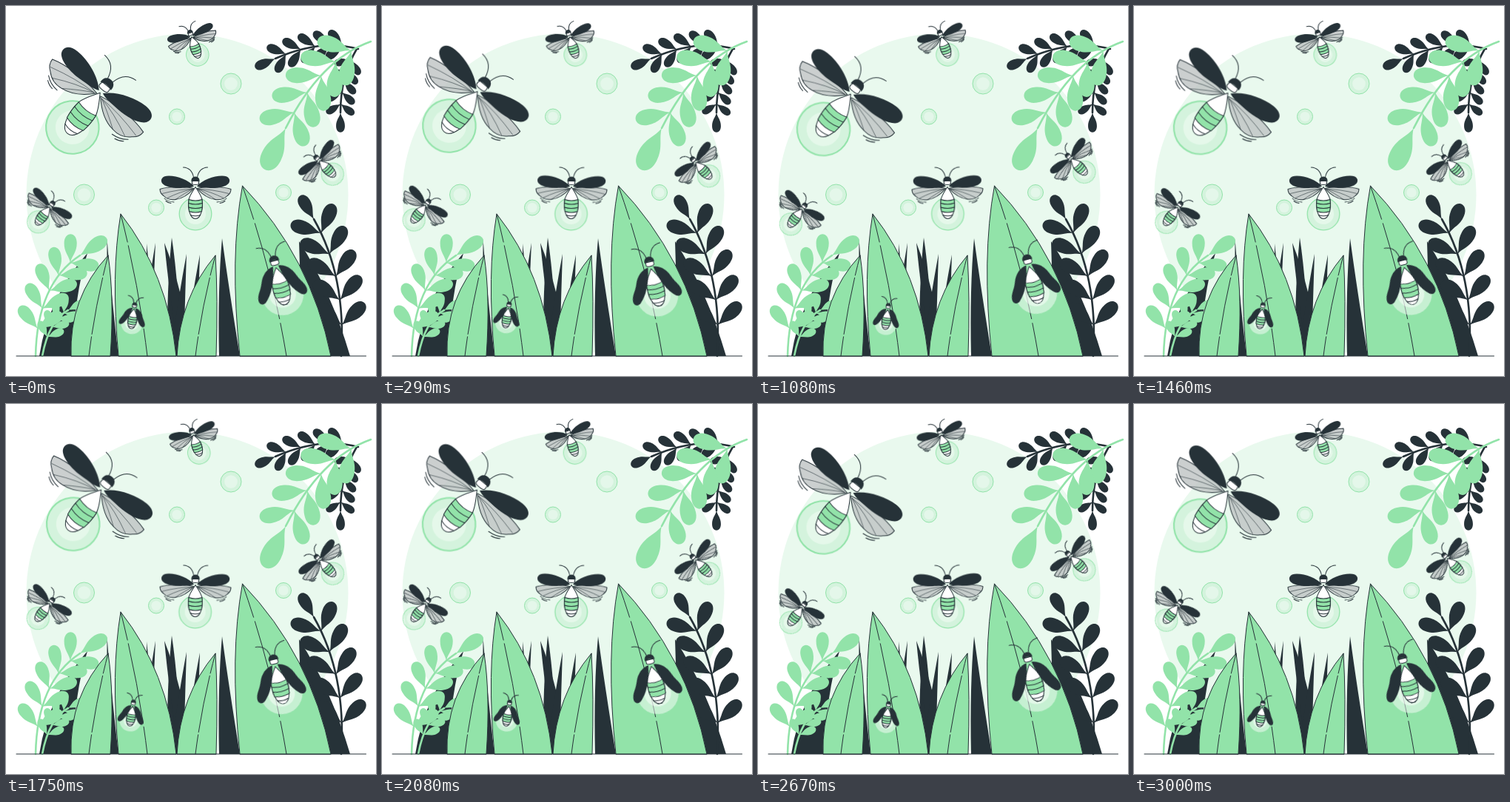
These frames come from a looping animation (500 px wide and 500 px high, 3.04 s). An HTML page:

```html
<!DOCTYPE html>
<html lang="en">
<head>
<meta charset="utf-8">
<title>Fireflies</title>
<style>
  html, body { margin: 0; width: 100%; height: 100%; overflow: hidden; background: #fff; }
  svg { display: block; width: 100%; height: 100%; }
  .dark { fill: #263238; }
  .green { fill: #92e3a9; }
  .line { fill: none; stroke: #263238; stroke-linecap: round; stroke-linejoin: round; vector-effect: non-scaling-stroke; }
  .vein { stroke-width: .6; }
  .line.white { fill: #fff; }
  .line.green { fill: #92e3a9; }
  .line.hind { fill: #bfc3c3; fill-opacity: .8; }
  .stem { fill: none; stroke-width: 2.6; stroke-linecap: round; }
  .stem.dark { stroke: #263238; fill: none; }
  .stem.green { stroke: #92e3a9; fill: none; }
  .halo { fill: #92e3a9; fill-opacity: .24; stroke: #92e3a9; }
  .core { fill: #fff; fill-opacity: .38; }
  .shine { fill: #fff; fill-opacity: .48; }
  #swarm { transform-origin: 250px 250px; animation: wind 1520ms linear infinite; }
  @keyframes wind {
    0%, 100% { transform: rotate(0deg); }
    25% { transform: rotate(1deg); }
    75% { transform: rotate(-1deg); }
  }
</style>
</head>
<body>
<svg viewBox="0 0 500 500">
  <defs>
    <path id="leaf" d="M0 0C.25 -.05 .35 -.22 .68 -.22C1.1 -.22 1.1 .22 .68 .22C.35 .22 .25 .05 0 0Z"/>

    <g id="hindwing">
      <path class="line hind" d="M-2 12C-16 9 -35 9 -48 13C-48 17 -46 20 -43 22C-39 26 -33 28 -27 27C-18 26 -9 20 -2 12Z"/>
      <path class="line vein" d="M-4 13Q-22 13 -45 19M-4 13Q-20 16 -38 25M-4 13Q-14 18 -27 27"/>
      <path class="line" d="M-42 25.5Q-37 30 -29 30.5M-40 29Q-37 31.5 -33 32"/>
    </g>
    <path id="openwing" class="dark" d="M-2 9C-9 1 -24 -5 -36 -5C-45 -5 -48 0 -45 5C-41 10 -30 12 -20 11.5C-12 11 -6 11 -2 9Z"/>
    <path id="shutwing" class="dark" d="M-3 8C-11 9 -17 15 -20 23C-23 31 -27 34 -28 40C-29 45 -25 49 -20 45C-13 39 -6 26 -3 8Z"/>

    <g id="belly">
      <path class="line white" d="M0 10C-3 15 -7 20 -9 27C-10.5 37 -8 53 0 53C8 53 10.5 37 9 27C7 20 3 15 0 10Z"/>
      <path class="line green" d="M-9 27Q0 30 9 27Q10 35 8.6 43Q0 46 -8.6 43Q-10 35 -9 27Z"/>
      <path class="line" d="M-9.4 32Q0 35 9.4 32M-9.3 37.5Q0 40.5 9.3 37.5M-6.6 48Q0 50.5 6.6 48"/>
    </g>
    <g id="head">
      <path class="line white" d="M-4 2C-6 7 -3 7 0 7C3 7 6 7 4 2Z"/>
      <path class="dark" d="M-5.5 3C-6 -1 -4 -4 0 -4C4 -4 6 -1 5.5 3C3 1 -3 1 -5.5 3Z"/>
      <path class="line" d="M-2.5 -3C-4 -11 -8 -16 -16.5 -16.5M2.5 -3C4 -11 8 -16 16.5 -16.5"/>
    </g>

    <g id="flyer">
      <circle class="halo" cy="46.5" r="21.8" stroke-width="1.3"/>
      <circle class="core" cy="46.5" r="14"/>
      <use href="#hindwing"/><use href="#hindwing" transform="scale(-1 1)"/>
      <use href="#belly"/>
      <use href="#openwing"/><use href="#openwing" transform="scale(-1 1)"/>
      <use href="#head"/>
    </g>
    <g id="sitter">
      <circle class="shine" cy="41" r="23.5"/>
      <circle class="shine" cy="41" r="15"/>
      <use href="#belly"/>
      <use href="#shutwing"/><use href="#shutwing" transform="scale(-1 1)"/>
      <use href="#head"/>
    </g>
  </defs>

  <circle cx="245" cy="255" r="217.5" fill="#e9f9ee"/>
  <g id="orbs"></g>
  <g id="grass"></g>
  <g id="plants"></g>
  <g id="blades"></g>
  <path class="line" d="M14 473H486.5"/>
  <g id="swarm"></g>
</svg>
<script>
  const GROUND = 473;
  const fill = (id, parts) => document.getElementById(id).innerHTML = parts.join('');

  // A blade stands on the ground from x0 to x1; each edge bows sideways on its way to the tip.
  const blade = (cls, x0, x1, tipX, tipY, bow0 = 0, bow1 = 0) => {
    const y = tipY + (GROUND - tipY) * .42;
    return `<path class="${cls}" d="M${x0} ${GROUND}Q${(x0 + tipX) / 2 + bow0} ${y} ${tipX} ${tipY}
      Q${(x1 + tipX) / 2 + bow1} ${y} ${x1} ${GROUND}Z"/>`;
  };
  const ribbed = (foot, x0, x1, tipX, tipY, bow0, bow1) =>
    blade('line green', x0, x1, tipX, tipY, bow0, bow1) +
    `<path class="line" pathLength="100" stroke-dasharray="20 2.5 56 2.5 30" style="vector-effect:none"
      d="M${tipX} ${tipY}Q${tipX + (foot - tipX) * .68} ${(tipY + GROUND) / 2} ${foot} ${GROUND}"/>`;

  // A branch bends from root to end, with leaf pairs along it and one leaf at its end.
  const leaf = (x, y, angle, size) =>
    `<use href="#leaf" transform="translate(${x} ${y}) rotate(${angle}) scale(${size})"/>`;
  const branch = (tone, root, bend, end, { pairs = 5, size, tip = size, spread = 48, from = .2, to = .88 }) => {
    const at = (t, k) => (1 - t) ** 2 * root[k] + 2 * t * (1 - t) * bend[k] + t * t * end[k];
    const slope = (t, k) => (1 - t) * (bend[k] - root[k]) + t * (end[k] - bend[k]);
    const angle = t => Math.atan2(slope(t, 1), slope(t, 0)) * 180 / Math.PI;
    let leaves = leaf(...end, angle(1), tip);
    for (let i = 0; i < pairs; i++) {
      const t = from + (to - from) * i / (pairs - 1);
      for (const side of [-1, 1]) leaves += leaf(at(t, 0), at(t, 1), angle(t) + side * spread, size);
    }
    return `<path class="stem ${tone}" d="M${root}Q${bend} ${end}"/><g class="${tone}">${leaves}</g>`;
  };

  fill('grass', [
    [45, 90, 110, 334, -20, -8], [138, 152, 136.5, 314, -1, -3],
    [180, 196, 202, 320], [190, 204, 190, 321],
    [218, 236, 224, 313, -4, 4], [234, 252, 214, 320, -4, 6], [222, 240, 244, 335], [240, 258, 262, 336],
    [288, 316, 292, 314, -4, -3], [400, 465, 396, 318, 0, 8]
  ].map(b => blade('dark', ...b)));

  fill('plants', [
    branch('dark', [453, 473], [460, 365], [416, 288], { size: 43, tip: 37 }),
    branch('green', [40, 473], [42, 375], [100, 337], { size: 39, tip: 43 }),
    branch('green', [49, 473], [58, 425], [84, 411], { pairs: 4, size: 24, from: .3 }),
    branch('dark', [476, 58], [425, 44], [364, 71], { size: 28, tip: 30, spread: 42 }),
    branch('dark', [474, 58], [452, 95], [452, 144], { size: 23, tip: 27, spread: 55 }),
    branch('green', [493, 48], [425, 72], [378, 165], { size: 48, tip: 63 })
  ]);

  fill('blades', [
    ribbed(112, 88, 141, 138, 337, -28, 7),
    ribbed(191, 152, 230, 155, 281, -12, 26),
    ribbed(256, 231, 284, 283, 337, -22, 3),
    ribbed(379, 316, 439, 319.5, 243, -16, 33)
  ]);

  const orb = ([x, y, r]) =>
    `<circle class="halo" cx="${x}" cy="${y}" r="${r}"/><circle class="core" cx="${x}" cy="${y}" r="${r * .63}"/>`;
  fill('orbs', [[105.5, 255, 14], [304, 105, 14], [231, 149.5, 10.5], [203, 272.5, 10.5], [375, 252, 10.5]].map(orb));

  const bug = (kind, x, y, turn, size) =>
    `<use href="#${kind}" transform="translate(${x} ${y}) rotate(${turn}) scale(${size})"/>`;
  fill('swarm', [
    bug('flyer', 137.5, 104.5, 38.7, 1.64),
    bug('flyer', 248.5, 35, -18.5, .7),
    bug('flyer', 63.5, 266, 37.5, .7),
    bug('flyer', 418.5, 204, -44.5, .7),
    bug('flyer', 256, 234.5, 0, 1),
    bug('sitter', 362, 342, -14, 1.2),
    bug('sitter', 174, 403, 8.6, .63)
  ]);
</script>
</body>
</html>
```
